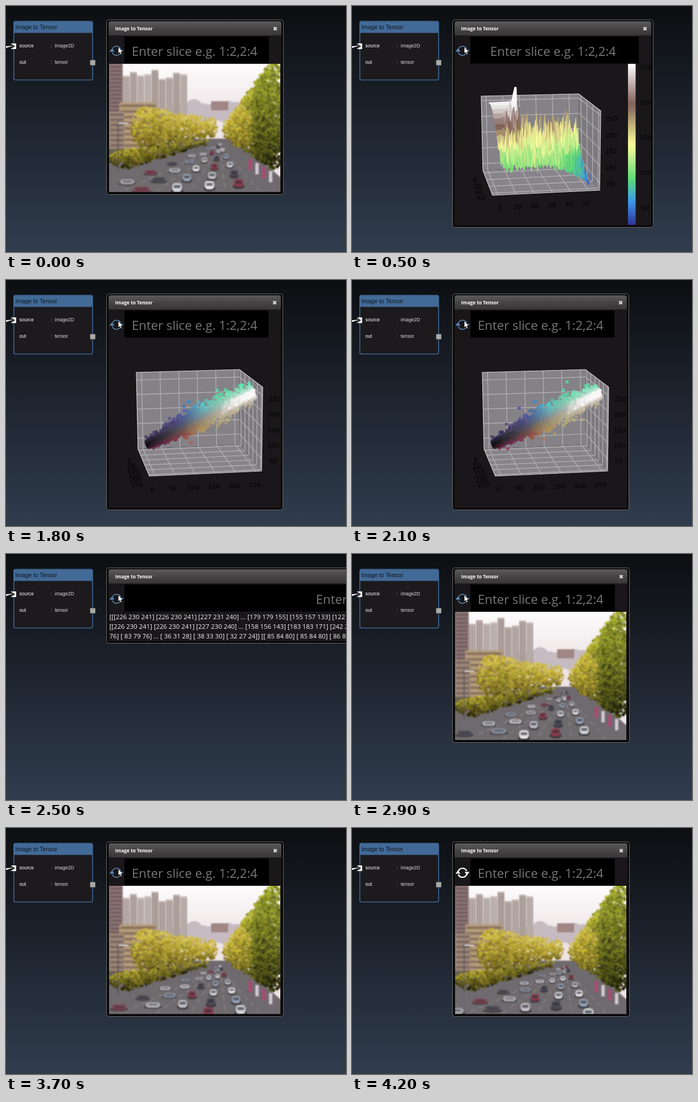
Recreate the animation shown at these times as an HTML page with a canvas. Size 600x434 px, loop 4300 ms.

```html
<!DOCTYPE html>
<html lang="en">
<head>
<meta charset="utf-8">
<title>Image to Tensor</title>
<style>
  html, body { margin: 0; width: 100%; height: 100%; overflow: hidden; background: #15191f; }
  canvas { display: block; }
</style>
</head>
<body>
<canvas id="stage" width="600" height="434"></canvas>
<script>
const LOOP = 4300, TICK = 100;
const SANS = '"Open Sans", sans-serif';
const ARIAL = '"Liberation Sans", Arial, sans-serif';
const PLOT = '11px "DejaVu Sans", sans-serif';
const stage = document.getElementById('stage').getContext('2d');
let g = stage;

const mix = (a, b, u) => a + (b - a) * u;
const clamp = u => Math.max(0, Math.min(1, u));
const smooth = (a, b, u) => { u = clamp((u - a) / (b - a)); return u * u * (3 - 2 * u); };
const between = (p, q, u) => [mix(p[0], q[0], u), mix(p[1], q[1], u)];
const ticks = (count, from, to) => Array.from({ length: count }, (_, i) => mix(from, to, i / (count - 1)));
const random = seed => {
  let s = seed * 7919 + 104729;
  return () => (s = s * 16807 % 2147483647) / 2147483647;
};

function rect(x, y, w, h, color) {
  g.fillStyle = color;
  g.fillRect(x, y, w, h);
}
function panel(x, y, w, h, radius, fill, stroke, line = 1) {
  g.beginPath();
  g.roundRect(x, y, w, h, radius);
  g.fillStyle = fill;
  g.fill();
  if (stroke) {
    g.strokeStyle = stroke;
    g.lineWidth = line;
    g.stroke();
  }
}
function poly(points, color) {
  g.beginPath();
  points.forEach(p => g.lineTo(...p));
  g.closePath();
  g.fillStyle = color;
  g.fill();
}
function blob(x, y, rx, ry, color) {
  g.beginPath();
  g.ellipse(x, y, rx, ry, 0, 0, 7);
  g.fillStyle = color;
  g.fill();
}
function text(str, x, y, font, color, align = 'left') {
  g.font = font;
  g.fillStyle = color;
  g.textAlign = align;
  g.fillText(str, x, y);
}
function vertical(y0, y1, ...colors) {
  const grad = g.createLinearGradient(0, y0, 0, y1);
  colors.forEach((c, i) => grad.addColorStop(i / (colors.length - 1), c));
  return grad;
}

// ---- node and window chrome ----

function drawNode() {
  panel(13.8, 27, 139, 103.5, 3, '#1c1a1c', '#3f6691', 1.6);
  rect(14, 27.5, 138.6, 20, '#426a97');
  text('Image to Tensor', 16.5, 41, '10.3px ' + ARIAL, '#10151c');
  [['source', 'image2D', 73], ['out', 'tensor', 102]].forEach(([name, type, y]) => {
    text(name, 23.5, y, '8.5px ' + ARIAL, '#fff');
    text(':', 79, y, '8.5px ' + ARIAL, '#bbb');
    text(type, 86, y, '8.5px ' + ARIAL, '#ddd');
  });
  rect(148, 95, 10, 10, '#222');
  rect(148.5, 95.5, 9, 9, '#aaa');
  rect(9, 66, 9, 10, '#eee');
  poly([[8, 66], [16, 71], [8, 76]], '#222');
  poly([[0, 71], [13, 70], [0, 74]], '#fff');
}

function drawRefresh(hover) {
  const color = hover ? '#5f8fc0' : '#fff';
  for (const k of [1, -1]) {
    g.save();
    g.translate(195, 79);
    g.scale(k, k);
    g.beginPath();
    g.arc(0, 0, 8, .16, 2.76);
    g.strokeStyle = color;
    g.lineWidth = hover ? 1.5 : 2.2;
    g.stroke();
    poly([[3.5, -1.5], [8, 4], [12.5, -1.5]], color);
    g.restore();
  }
}

function drawCursor() {
  poly([[198, 72], [198, 84], [200.8, 81.8], [202.6, 86], [204.6, 85], [202.8, 81], [206.2, 80.8]], '#fff');
  g.strokeStyle = '#000';
  g.lineWidth = .8;
  g.stroke();
}

function drawWindow(width, height, hintX) {
  const right = 177.5 + width;
  panel(177.5, 24.5, width, height, 4, '#080708', '#6b6866');
  rect(181, 52, width - 7, height - 31, '#191719');
  panel(181, 27, width - 7, 25, [4, 4, 1, 1], vertical(27, 52, '#5c5a5b', '#464445', '#383637'));
  text('Image to Tensor', 192.5, 43, 'bold 8.3px ' + SANS, '#fff');
  g.strokeStyle = '#d6d6d6';
  g.lineWidth = 2.4;
  g.beginPath();
  for (const k of [1, -1]) {
    g.moveTo(right - 17, 40 - 2.6 * k);
    g.lineTo(right - 11.8, 40 + 2.6 * k);
  }
  g.stroke();
  rect(209, 54, width - 57, 47.5, '#000');
  text('Enter slice e.g. 1:2,2:4', hintX, 88, '22.2px ' + SANS, '#777');
}

// ---- street view, in its own 302 x 226 layer ----

function newLayer() {
  const layer = document.createElement('canvas');
  layer.width = 302;
  layer.height = 226;
  return layer.getContext('2d');
}

function paintScenery() {
  const rnd = random(5);
  const block = (x, y, w, h, color, pitch) => {
    rect(x, y, w, h, color);
    for (let row = y + 4; row < y + h; row += pitch) rect(x + 2, row, w - 4, pitch * .4, 'rgba(70,52,55,.4)');
  };
  const canopy = (cx, cy, rx, ry, hue, light) => {
    for (let i = 0; i < rx * ry * .4; i++) {
      const a = rnd() * 6.283, r = Math.sqrt(rnd());
      const shade = light + 20 * (rnd() - .5) - 14 * r * Math.sin(a);
      blob(cx + rx * r * Math.cos(a), cy + ry * r * Math.sin(a), 1 + 2.4 * rnd(), 1 + 2 * rnd(),
        `hsl(${hue + 8 * rnd()},${45 + 20 * rnd()}%,${shade}%)`);
    }
  };
  rect(0, 0, 302, 226, vertical(0, 90, '#fdfcfd', '#eee4e6'));
  for (let i = 0; i < 9; i++) blob(120 + i * 15, 86, 18, 14 + 10 * rnd(), '#c6bbc1');
  rect(180, 66, 30, 16, '#a08784');
  for (let i = 0; i < 9; i++) {
    const x = 24 + i * 12.7, top = 10 + 18 * rnd();
    rect(x, top, 12, 90, `hsl(18,12%,${68 + 10 * rnd()}%)`);
    for (let k = 2; k < 12; k += 4) rect(x + k, top + 3, 1.4, 90, 'rgba(105,85,85,.5)');
  }
  block(0, 0, 24, 100, '#8a7373', 7);
  block(18, 68, 66, 85, '#b39b78', 10);
  block(0, 84, 27, 75, '#9b8677', 9);
  poly([[0, 165], [150, 132], [225, 132], [302, 200], [302, 226], [0, 226]], '#6f6a6d');
  rect(0, 150, 75, 18, '#6b6352');
  for (let i = 0; i <= 7; i++) {
    const u = i / 7;
    canopy(mix(180, 66, u), mix(112, 113, u), mix(11, 27, u), mix(17, 37, u), 47, mix(48, 42, u));
    canopy(mix(165, 30, u), mix(138, 168, u), mix(10, 30, u), mix(6, 16, u), 50, 27);
    canopy(mix(210, 290, u), mix(116, 92, u), mix(9, 32, u), mix(18, 94, u), mix(48, 60, u), mix(46, 27, u));
  }
  canopy(232, 112, 20, 38, 48, 43);
  for (let i = 0; i < 4; i++) rect(246 + 12 * i, 168 + 7 * i, 6, 20, i % 2 ? '#d2c6d2' : '#a94a73');
  rect(15, 101, 1.5, 90, '#55504e');
  rect(16, 104, 18, 2, '#ddd');
}

function drawCar(x, y, size, color, passing) {
  const w = size * (passing ? 1.6 : 1), h = size * (passing ? .6 : .9);
  blob(x, y + h * .4, w * .65, h * .35, 'rgba(35,30,35,.7)');
  panel(x - w / 2, y - h / 2, w, h, size * .3, color);
  rect(x - w * .34, y - h * .28, w * .68, h * .35, 'rgba(45,48,58,.7)');
}

const scenery = g = newLayer();
paintScenery();
const traffic = newLayer();
g = stage;

function drawStreet(tick) {
  const paints = ['#efedf0', '#c7c5cd', '#8c3a4a', '#4b4a55', '#d9dbe2', '#9aa6ba'];
  g = traffic;
  g.drawImage(scenery.canvas, 0, 0);
  for (let lane = 0; lane < 5; lane++) {
    const end = lane * 62 - 12, passing = lane < 2;
    g.strokeStyle = 'rgba(230,225,225,.4)';
    g.setLineDash([9, 7]);
    g.beginPath();
    g.moveTo(196, 146);
    g.lineTo(end + 31, 226);
    g.stroke();
    const shift = lane * .13 + tick * (passing ? -.021 : .011);
    g.globalAlpha = passing ? .7 : .95;
    for (let i = 0; i < 6; i++) {
      const u = i / 6 + (shift % (1 / 6) + 1 / 6) % (1 / 6);
      const id = i - Math.floor(shift * 6) + 600;
      const d = u ** 1.3;
      drawCar(mix(196, end, d), mix(142, 226, d), mix(5, 18, d), paints[(id * 5 + lane) % 6], passing);
    }
    g.globalAlpha = 1;
  }
  g = stage;
  g.save();
  g.beginPath();
  g.rect(182, 102, 302, 226);
  g.clip();
  g.drawImage(traffic.canvas, 182, 102);
  g.filter = 'blur(0.8px)';
  g.drawImage(traffic.canvas, 182, 102);
  g.restore();
}

// ---- 3D plots ----

function pane([a, b, c, d], across, down, color) {
  poly([a, b, c, d], color);
  g.strokeStyle = '#b5b3b6';
  g.lineWidth = 1.2;
  g.beginPath();
  const line = (p, q) => { g.moveTo(...p); g.lineTo(...q); };
  across.forEach(u => line(between(a, b, u), between(d, c, u)));
  down.forEach(v => line(between(a, d, v), between(b, c, v)));
  g.stroke();
}
// Corners: top back-left, back-right, front-right, then the floor clockwise from back-left
function drawAxes([a, b, c, d, e, f, h], xs, ys, zs) {
  pane([a, b, e, d], xs, zs, '#858287');
  pane([b, c, f, e], ys, zs, '#7d7a7f');
  pane([d, e, f, h], xs, ys, '#88858a');
  g.strokeStyle = '#d2d0d2';
  g.beginPath();
  [a, d, h, f, c, b].forEach(p => g.lineTo(...p));
  g.closePath();
  g.stroke();
}
// Evenly spaced tick labels from one centre point to another
function labels(from, by, count, first, last) {
  for (let i = 0; i < count; i++) {
    const [x, y] = between(first, last, i / (count - 1));
    text(from + by * i, x, y + 4, PLOT, '#020202', 'center');
  }
}

const terrainStops = [[0, 51, 51, 153], [.15, 60, 155, 238], [.28, 92, 218, 118],
                      [.5, 253, 252, 155], [.75, 128, 94, 88], [1, 255, 255, 255]];
function terrain(height, light = 1) {
  const v = clamp(height);
  const i = Math.max(1, terrainStops.findIndex(s => s[0] >= v));
  const [p, q] = [terrainStops[i - 1], terrainStops[i]];
  const u = (v - p[0]) / (q[0] - p[0]);
  return `rgb(${[1, 2, 3].map(k => mix(p[k], q[k], u) * light)})`;
}

function drawSurface(tick) {
  const box = [[228, 159], [400, 155], [439, 185], [231, 290], [402, 281], [437, 325], [248, 334]];
  drawAxes(box, ticks(6, .05, .9), ticks(4, .1, .91), ticks(5, .06, .91));
  const [, , , backLeft, backRight, frontRight, frontLeft] = box;
  const cols = 58, rows = 20, rnd = random(31);
  const grid = [];
  for (let r = 0; r <= rows; r++) {
    grid.push([]);
    for (let c = 0; c <= cols; c++) {
      const u = c / cols, d = r / rows;
      const sky = u < .3 ? .94 : .46;
      const ground = .33 - .26 * u ** 5;
      const rough = smooth(.26, .4, u + d * .6);
      const peak = rnd() ** 3 * .4 * (1 - .45 * d) - rnd() * .08 + .02 * Math.sin(tick + c * r);
      const height = Math.max(.03, mix(sky, ground, smooth(.08, .75, d)) + peak * rough);
      const across = mix(.055 + .09 * d, .93, u), deep = mix(.04, .92, d);
      const [x, y] = between(between(backLeft, backRight, across), between(frontLeft, frontRight, across), deep);
      grid[r].push([x, y - height * mix(128, 140, deep), height]);
    }
  }
  for (let r = 0; r < rows; r++)
    for (let c = 0; c < cols; c++) {
      const [a, b, p, q] = [grid[r][c], grid[r][c + 1], grid[r + 1][c + 1], grid[r + 1][c]];
      const color = terrain((a[2] + b[2] + p[2] + q[2]) / 3.75, .97 + .3 * clamp(b[2] - a[2]) - .15 * clamp(a[2] - b[2]));
      poly([a, b, p, q].map(v => v.slice(0, 2)), color);
      g.strokeStyle = color;
      g.lineWidth = .5;
      g.stroke();
    }
  labels(0, 10, 6, [262, 355], [413, 348]);
  labels(0, 20, 4, [217, 307], [228, 339]);
  labels(50, 50, 5, [456, 313], [458, 199]);
  rect(487, 102, 13.5, 284, vertical(102, 386, ...ticks(30, 1, 0).map(v => terrain(v))));
  labels(50, 50, 5, [518, 356], [518, 108]);
}

function drawScatter(tick) {
  const wide = tick < 15;
  const xs = ticks(6, .05, .95);
  drawAxes([[230, 163], [412, 158], [453, 189], [233, 298], [413, 290], [451, 337], [253, 346]],
    xs, xs, wide ? ticks(6, .1, .97) : ticks(5, .1, .86));
  const still = random(23), live = random(100 + tick);
  for (let i = 0; i < 1600; i++) {
    const rnd = i < 60 ? live : still;
    const u = rnd();
    const v = ((rnd() + rnd() + rnd()) / 1.5 - 1) * (i < 110 ? 1.7 : 1);
    const up = clamp(-v), down = clamp(v);
    const half = 4 + Math.sin(Math.PI * (.06 + .8 * u)) * (v < 0 ? 27 : 21);
    const x = mix(249, 438, u) + v * half * .4, y = mix(291, 199, u) + v * half;
    const hue = v < 0 ? mix(250, 155, smooth(.2, .75, u)) : mix(320, 395, smooth(.1, .55, u)) + 20 * rnd();
    const tint = 6 + up * mix(35, 95, smooth(.2, .8, u)) + down * 60 * (1 - .6 * u);
    const level = mix(6 + 92 * u, 55, clamp(up + down) * (.35 + .4 * u));
    blob(x, y, 3, 3, `hsla(${hue},${tint}%,${level}%,.62)`);
  }
  // bright core narrowing to the far corner
  for (let i = 0; i < 160; i++) {
    const k = still(), u = mix(.7, 1, k), v = still() - .5;
    blob(mix(249, 438, u), mix(291, 199, u) + v * mix(20, 9, k), 3, 3, `rgba(250,247,248,${.1 + .4 * k})`);
  }
  labels(0, 50, 6, [218, 318], [232, 361]);
  if (wide) {
    labels(50, 50, 5, [293, 367], [440, 361]);
    labels(0, 50, 6, [472, 338], [474, 210]);
  } else {
    labels(0, 50, 6, [258, 369], [439, 361]);
    labels(50, 50, 5, [471, 319], [474, 210]);
  }
}

function drawNumbers() {
  ['[[[226 230 241] [226 230 241] [227 231 240] ... [179 179 155] [155 157 133] [122 124 101]',
   '[[226 230 241] [226 230 241] [227 230 240] ... [158 156 143] [183 183 171] [242 242 231]',
   '76] [ 83 79 76] ... [ 36 31 28] [ 38 33 30] [ 32 27 24]] [[ 85 84 80] [ 85 84 80] [ 86 85 81]']
    .forEach((row, i) => text(row, 182.5, 115 + 17 * i, '11.35px ' + SANS, '#f4f4f4'));
}

// ---- timeline ----

function draw(ms) {
  const t = ms % LOOP, tick = Math.floor(t / TICK);
  rect(0, 0, 600, 434, vertical(0, 434, '#0c0e11', '#1e2530', '#303d4d'));
  drawNode();
  if (t >= 300 && t < 900) {
    drawWindow(354, 366, 244);
    drawSurface(tick);
  } else if (t >= 900 && t < 2200) {
    drawWindow(311, 381, 222);
    drawScatter(tick);
  } else if (t >= 2200 && t < 2800) {
    drawWindow(960, 133, 547);
    drawNumbers();
  } else {
    drawWindow(312, 308, 222);
    drawStreet(tick);
  }
  const hover = t < 3800;
  drawRefresh(hover);
  if (hover) drawCursor();
}

const start = performance.now();
function frame() {
  draw(performance.now() - start);
  requestAnimationFrame(frame);
}
frame();
</script>
</body>
</html>
```
